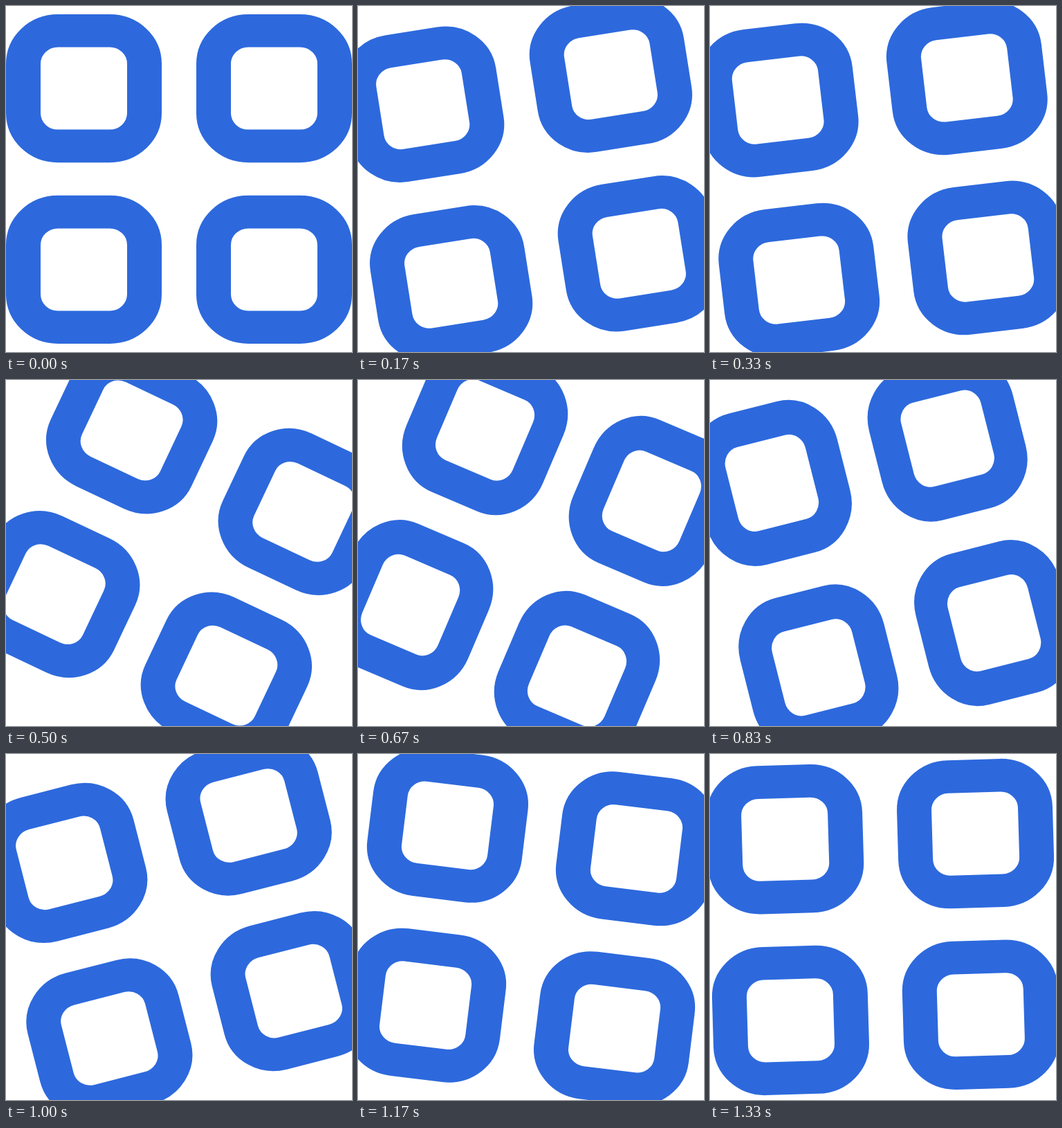
Write an HTML page that moves like this. It is 500x500 px and loops after 1.41 s.

```html
<!DOCTYPE html>
<html lang="en">
<head>
<meta charset="utf-8">
<title>Spinning tiles</title>
<style>
  html, body { margin: 0; width: 100%; height: 100%; overflow: hidden; background: #fff; }
  svg { display: block; width: 100%; height: 100%; }
</style>
</head>
<body>
<svg viewBox="-250 -250 500 500">
  <g id="tiles">
    <g transform="scale(25 23.8)" fill="none" stroke="#2d69dd" stroke-width="2">
      <rect x="-9" y="-9" width="7" height="7" rx="2"/>
      <rect x="2" y="-9" width="7" height="7" rx="2"/>
      <rect x="-9" y="2" width="7" height="7" rx="2"/>
      <rect x="2" y="2" width="7" height="7" rx="2"/>
    </g>
  </g>
</svg>
<script>
  const LOOP = 1410, STEP = 1000 / 12;
  // Wind up, full turn, overshoot and settle: degrees at every second step.
  const angles = [0, -9, -6.7, 25.3, 113.1, 255.8, 345.6, 367, 358.3, 360];
  const tiles = document.getElementById('tiles');
  const angle = i => angles[Math.max(0, Math.min(i, angles.length - 1))];

  // Catmull-Rom interpolation through the angles.
  function spin(x) {
    const i = Math.floor(x), u = x - i;
    const [a, b, c, d] = [-1, 0, 1, 2].map(k => angle(i + k));
    return b + u / 2 * (c - a + u * (2 * a - 5 * b + 4 * c - d + u * (3 * (b - c) + d - a)));
  }

  const start = performance.now();
  function draw() {
    const time = (performance.now() - start) % LOOP;
    const step = Math.floor((time + 3.4) / STEP);
    tiles.setAttribute('transform', `rotate(${spin(step / 2)})`);
    requestAnimationFrame(draw);
  }
  draw();
</script>
</body>
</html>
```
